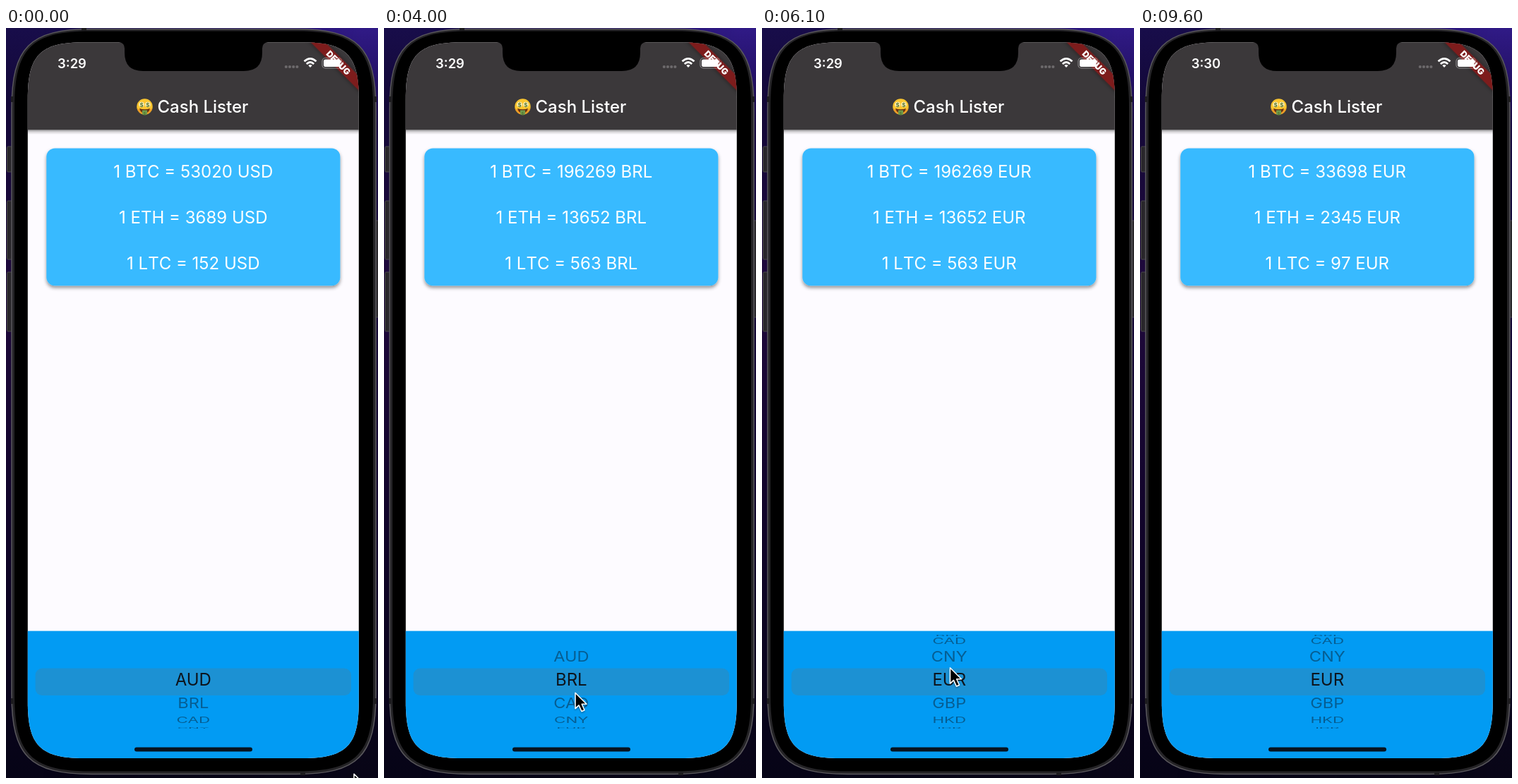
Recreate the animation shown at these times as an HTML page. Size 527 px wide and 1063 px high, loop 9700 ms.

```html
<!DOCTYPE html>
<html lang="en">
<head>
<meta charset="utf-8">
<title>Cash Lister</title>
<style>
  html, body { margin: 0; width: 100%; height: 100%; overflow: hidden; background: #12062c; }
  svg { display: block; width: 100%; height: 100%; font-family: Inter, Roboto, sans-serif; }
  .center { text-anchor: middle; }
  .rate { font-size: 24px; fill: #fff; font-kerning: none; }
  .item { font-size: 24px; fill: #0d141c; }
</style>
</head>
<body>
<svg viewBox="0 0 527 1063" preserveAspectRatio="none">
  <defs>
    <linearGradient id="wallLeft" x2="0" y2="1">
      <stop offset="0" stop-color="#180d4a"/>
      <stop offset=".1" stop-color="#130838"/>
      <stop offset=".35" stop-color="#1f093c"/>
      <stop offset=".65" stop-color="#11042a"/>
      <stop offset="1" stop-color="#060416"/>
    </linearGradient>
    <linearGradient id="wallRight" x2="0" y2="1">
      <stop offset="0" stop-color="#301a86"/>
      <stop offset=".06" stop-color="#25126a"/>
      <stop offset=".13" stop-color="#180b40"/>
      <stop offset=".6" stop-color="#12072e"/>
      <stop offset="1" stop-color="#080516"/>
    </linearGradient>
    <linearGradient id="wallMix">
      <stop offset=".1" stop-color="#000"/>
      <stop offset=".95" stop-color="#fff"/>
    </linearGradient>
    <linearGradient id="barShadow" x2="0" y2="1">
      <stop offset="0" stop-opacity=".42"/>
      <stop offset=".5" stop-opacity=".14"/>
      <stop offset="1" stop-opacity="0"/>
    </linearGradient>
    <mask id="rightSide"><rect width="527" height="1063" fill="url(#wallMix)"/></mask>
    <filter id="cardShadow" x="-10%" y="-10%" width="120%" height="125%">
      <feDropShadow dx="0" dy="3" stdDeviation="2.6" flood-opacity=".42"/>
    </filter>
    <filter id="soft" x="-20%" y="-60%" width="140%" height="220%">
      <feDropShadow dx="0" dy="0" stdDeviation="3" flood-opacity=".5"/>
    </filter>
    <filter id="cursorShadow" x="-40%" y="-30%" width="190%" height="180%">
      <feDropShadow dx="0" dy="1.5" stdDeviation="1.2" flood-opacity=".35"/>
    </filter>
    <clipPath id="screen"><path id="screenShape"/></clipPath>
    <clipPath id="aboveBelow"><path d="M30 855H501V907.6H30ZM30 946H501V999H30Z"/></clipPath>
    <clipPath id="band"><rect x="30" y="907.6" width="471" height="38.4"/></clipPath>
  </defs>

  <rect width="527" height="1063" fill="url(#wallLeft)"/>
  <rect width="527" height="1063" fill="url(#wallRight)" mask="url(#rightSide)"/>

  <g fill="#29272b" stroke="#48464b">
    <rect x="1.5" y="168" width="8" height="36" rx="1.5"/>
    <rect x="1.5" y="245" width="8" height="83" rx="1.5"/>
    <rect x="1.5" y="346" width="8" height="84" rx="1.5"/>
    <rect x="521" y="273" width="7" height="137" rx="1.5"/>
  </g>
  <path id="rim" fill="#252427" stroke="#5a585d" stroke-width="1.5"/>
  <path d="M9 97v8M9 950v8M523 97v8M523 950v8M107 2h7M417 1057h7" stroke="#1d1c1f" stroke-width="4"/>
  <path id="bezel" fill="#000"/>

  <g clip-path="url(#screen)">
    <rect x="30" y="20" width="471" height="1016" fill="#fdfbff"/>
    <rect x="30" y="144" width="471" height="7" fill="url(#barShadow)"/>
    <rect x="30" y="20" width="471" height="124.2" fill="#3b383a"/>
    <rect x="57.3" y="170.6" width="416.1" height="194.6" rx="12" fill="#38baff" filter="url(#cardShadow)"/>
    <rect x="30" y="854.6" width="471" height="181" fill="#029bf3"/>
    <rect x="41.6" y="907.6" width="447.4" height="38.4" rx="9.6" fill="#1c91d3"/>
    <g id="faded" clip-path="url(#aboveBelow)" opacity=".447"></g>
    <g id="solid" clip-path="url(#band)"></g>
    <rect x="182" y="1019.5" width="167" height="6" rx="3" fill="#07131f"/>

    <g transform="translate(499.8 20.3) rotate(45)">
      <rect x="-60" y="33.7" width="120" height="14.4" fill="#7d1f1b" filter="url(#soft)"/>
      <text class="center" y="45.3" font-size="12.3" font-weight="900" fill="#fff">DEBUG</text>
    </g>
  </g>

  <path d="M160 20Q168 21 168 29V35Q168 61 194 61H337Q363 61 363 35V29Q363 21 371 20Z" fill="#000"/>

  <text id="clock" class="center" x="93.5" y="57" font-size="18.4" font-weight="600" fill="#fff"></text>
  <g fill="#6d6a6c">
    <circle cx="396.8" cy="55" r="2.1"/><circle cx="402" cy="55" r="2.1"/>
    <circle cx="407.2" cy="55" r="2.1"/><circle cx="412.4" cy="55" r="2.1"/>
  </g>
  <g fill="none" stroke="#fff" stroke-width="2.7">
    <path d="M422.5 47.3Q431 39.3 439.5 47.3"/>
    <path d="M425.8 51Q431 46 436.2 51"/>
    <path d="M428.3 53Q431 50.8 433.7 53L431 56Z" fill="#fff" stroke="none"/>
  </g>
  <rect x="448" y="42.5" width="27.5" height="14.5" rx="4.5" fill="none" stroke="#fff" stroke-opacity=".4" stroke-width="1.2"/>
  <rect x="450" y="44.5" width="23.5" height="10.5" rx="2.8" fill="#fff"/>
  <path d="M477 47.3Q479.5 49.7 477 52.2Z" fill="#fff" fill-opacity=".5"/>

  <g transform="translate(196.5 111.5)">
    <circle r="11.2" fill="#fbc62f"/>
    <path d="M-11 2A11.2 11.2 0 0 0 11 2Q0 10-11 2" fill="#ec9a26"/>
    <path d="M-7.5 2.5Q0 5 7.5 2.5Q6 9 0 9T-7.5 2.5" fill="#6b3212"/>
    <path d="M-3.5 5H3.5V9.5Q3.5 12 0 12T-3.5 9.5Z" fill="#6f9a4b"/>
    <circle cx="-4.4" cy="-3" r="3.8" fill="#fff0b5"/>
    <circle cx="4.4" cy="-3" r="3.8" fill="#fff0b5"/>
    <g class="center" font-size="8" font-weight="700" fill="#54752f">
      <text x="-4.4" y="0">$</text><text x="4.4" y="0">$</text><text y="11" font-size="5">$</text>
    </g>
  </g>
  <text x="214.5" y="120" font-size="24" font-weight="500" fill="#fff">Cash Lister</text>

  <g id="rates"></g>

  <g id="cursor" filter="url(#cursorShadow)">
    <path d="M1 1.3V23.6L6 18.9L10 27.5L14 25.7L10.2 17.3H17Z" fill="#000" stroke="#fff" stroke-width="1.5" stroke-linejoin="round"/>
  </g>
</svg>

<script>
const LOOP = 9700, STEP = 100;
const CODES = ['AUD', 'BRL', 'CAD', 'CNY', 'EUR', 'GBP', 'HKD', 'IDR', 'ILS'];
const COINS = ['BTC', 'ETH', 'LTC'];

// Each row starts with its time in ms.
const WHEEL = [[0, 0], [1200, 0], [1500, .505], [1700, .68], [1900, .94], [2100, 1],
  [4400, 1], [4700, 1.9], [5000, 3], [5200, 3.5], [5400, 3.8], [5600, 3.95], [5800, 4]];
const POINTER = [[0, 492, 1056], [300, 492, 1056], [1000, 272, 926], [1200, 272, 926],
  [1500, 272, 889], [3200, 272, 889], [3800, 270, 941], [4400, 270, 941],
  [4900, 266, 847], [5700, 266, 847], [6500, 265, 964], [7800, 265, 964], [8500, 535, 960]];
const PRICES = [[0, 53020, 3689, 152], [3000, 196269, 13652, 563], [6300, 33698, 2345, 97]];
const CLOCK = [[0, '3:29'], [8500, '3:30']];

const CENTER_X = 265.3, CENTER_Y = 927, RADIUS = 77.2, ITEM_ANGLE = .445, DEPTH = .1926;

const byId = id => document.getElementById(id);
const linear = k => k;
const smooth = k => k * k * (3 - 2 * k);

// Rounded box whose corners ease into the sides, like the phone's outline.
function setRoundedBox(id, left, top, right, bottom, radius) {
  const e = radius * 1.4, k = radius * .315;
  byId(id).setAttribute('d', `M${left + e} ${top}H${right - e}
    C${right - k} ${top} ${right} ${top + k} ${right} ${top + e}V${bottom - e}
    C${right} ${bottom - k} ${right - k} ${bottom} ${right - e} ${bottom}H${left + e}
    C${left + k} ${bottom} ${left} ${bottom - k} ${left} ${bottom - e}V${top + e}
    C${left} ${top + k} ${left + k} ${top} ${left + e} ${top}Z`);
}

function addText(parent, className, x, y) {
  const node = document.createElementNS('http://www.w3.org/2000/svg', 'text');
  node.setAttribute('class', 'center ' + className);
  node.setAttribute('x', x);
  node.setAttribute('y', y);
  return parent.appendChild(node);
}

const stepAt = (table, t) => table.filter(row => row[0] <= t).pop().slice(1);

function tween(table, t, ease) {
  const next = table.findIndex(row => row[0] > t);
  if (next < 0) return table[table.length - 1].slice(1);
  const a = table[next - 1], b = table[next];
  const k = ease((t - a[0]) / (b[0] - a[0]));
  return a.slice(1).map((v, i) => v + (b[i + 1] - v) * k);
}

setRoundedBox('rim', 8, 1.5, 524, 1057.5, 81);
setRoundedBox('bezel', 12, 4.5, 520, 1053.5, 77);
setRoundedBox('screenShape', 30.8, 20.3, 499.8, 1035, 57);

const rateLines = COINS.map((_, i) => addText(byId('rates'), 'rate', CENTER_X, 211.8 + 65 * i));
const wheelItems = ['faded', 'solid'].flatMap(layer => CODES.map((code, index) => {
  const node = addText(byId(layer), 'item', 0, 4.8);
  node.textContent = code;
  return { node, index };
}));

// Cylinder seen in perspective: w grows as an item turns away from the viewer.
function placeItem({ node, index }, position) {
  const angle = (index - position) * ITEM_ANGLE;
  const sin = Math.sin(angle), cos = Math.cos(angle);
  const w = 1 + DEPTH * (1 - cos);
  const scaleY = (cos * w - DEPTH * sin * sin) / (w * w);
  const visible = Math.abs(angle) < Math.PI / 2 && scaleY > 0;
  node.style.display = visible ? '' : 'none';
  if (!visible) return;
  node.setAttribute('transform',
    `translate(${CENTER_X} ${CENTER_Y + RADIUS * sin / w}) scale(${1 / w} ${scaleY})`);
}

function draw(t) {
  const [position] = tween(WHEEL, t, linear);
  wheelItems.forEach(item => placeItem(item, position));

  const selected = Math.round(position);
  const currency = selected ? CODES[selected] : 'USD';
  const prices = stepAt(PRICES, t);
  rateLines.forEach((line, i) => {
    line.textContent = `1 ${COINS[i]} = ${prices[i]} ${currency}`;
  });

  byId('clock').textContent = stepAt(CLOCK, t)[0];
  byId('cursor').setAttribute('transform', `translate(${tween(POINTER, t, smooth).join(' ')})`);
}

const start = performance.now();
function tick() {
  const t = (performance.now() - start) % LOOP;
  draw(Math.floor(t / STEP) * STEP);
  requestAnimationFrame(tick);
}
tick();
</script>
</body>
</html>
```
